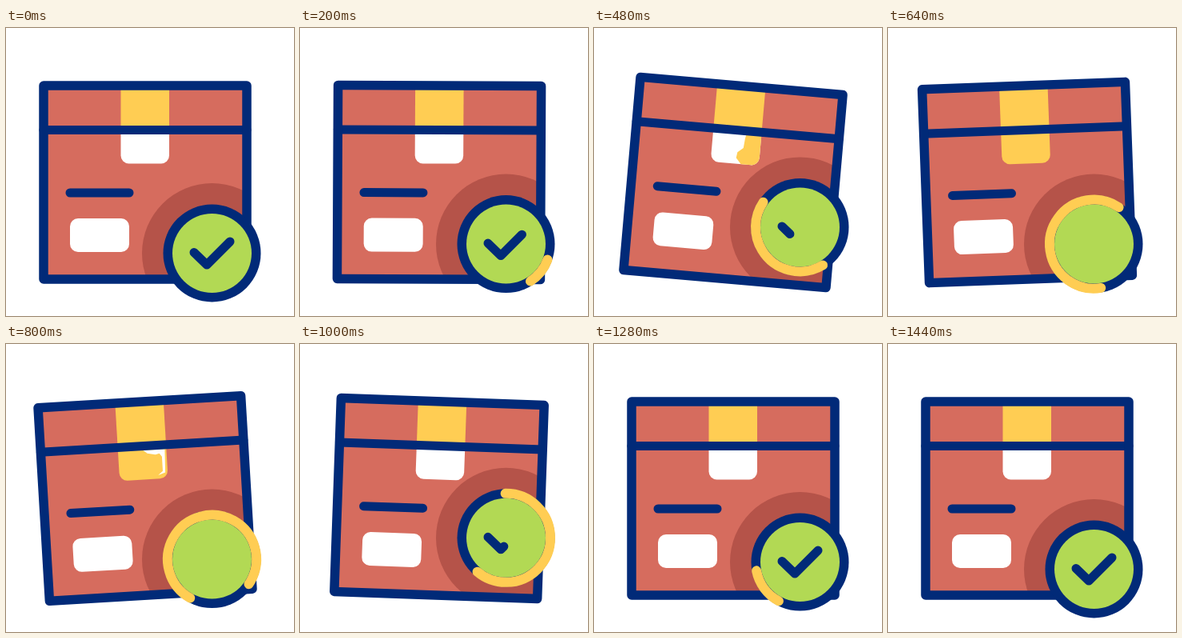
Write an HTML page with a canvas that moves like this. It is 360 px wide and 360 px high and loops after 2 s.

```html
<!DOCTYPE html>
<html lang="en">
<head>
<meta charset="utf-8">
<title>Parcel delivered</title>
<style>
  html, body { margin: 0; width: 100%; height: 100%; overflow: hidden; background: #fff; }
  canvas { display: block; width: 360px; height: 360px; }
</style>
</head>
<body>
<canvas id="stage"></canvas>
<script>
const SIZE = 360, LOOP = 2000, STEP = 40, RAD = Math.PI / 180;
const NAVY = '#012a78', RED = '#d66c5e', SHADE = '#b55349',
      YELLOW = '#ffcd53', GREEN = '#b2d954', WHITE = '#fff';

// Each track is a list of [ms, value].
const TILT = [[150, 0], [480, 5], [720, -4.5], [1020, 2.1], [1240, 0]];
const BADGE_Y = [[80, 281.5], [400, 244.5], [720, 274.5], [1020, 242], [1400, 281.5]];
const CHECK = [[120, 1], [640, 0], [800, 0], [1236, 1]];
const SPIN = [[50, 0], [1362, 180]];
const HEAD = [[115, 0], [962, 360]];
const TAIL = [[773, 0], [1362, 360]];

const FILL_EDGE = [[185, 132], [184, 138], [183, 149], [176, 155], [175, 162], [182, 170]];
const DRAIN_EDGE = [[175, 133], [180, 137], [190, 139], [195, 138], [198, 142], [198, 160], [192, 165]];

const canvas = document.getElementById('stage');
const ctx = canvas.getContext('2d');
const ratio = window.devicePixelRatio || 1;
canvas.width = canvas.height = SIZE * ratio;

const linear = p => p;
const smooth = p => (1 - Math.cos(Math.PI * p)) / 2;

function at(track, t, ease = smooth) {
  if (t <= track[0][0]) return track[0][1];
  for (let i = 1; i < track.length; i++) {
    const [t0, a] = track[i - 1], [t1, b] = track[i];
    if (t < t1) return a + (b - a) * ease((t - t0) / (t1 - t0));
  }
  return track[track.length - 1][1];
}

function shape(color, build) {
  ctx.fillStyle = color;
  ctx.beginPath();
  build();
  ctx.fill();
}

function line(points, color = NAVY, width = 11) {
  ctx.strokeStyle = color;
  ctx.lineWidth = width;
  ctx.beginPath();
  points.forEach(([x, y]) => ctx.lineTo(x, y));
  ctx.stroke();
}

function disc(x, y, r, color) {
  shape(color, () => ctx.arc(x, y, r, 0, 2 * Math.PI));
}

function turn(deg) {
  ctx.translate(174, 193);
  ctx.rotate(deg * RAD);
  ctx.translate(-174, -193);
}

function polygon(points) {
  points.forEach(([x, y]) => ctx.lineTo(x, y));
  ctx.closePath();
}

function drawFlap(t) {
  const full = t >= 560 && t < 880;
  ctx.save();
  ctx.beginPath();
  ctx.roundRect(143.5, 128, 60.5, 41.5, [0, 0, 10, 10]);
  ctx.clip();
  ctx.fillStyle = full ? YELLOW : WHITE;
  ctx.fillRect(140, 125, 70, 50);
  if (t >= 440 && t < 560) {
    const dx = (480 - t) * 0.4;
    shape(YELLOW, () => polygon([...FILL_EDGE.map(([x, y]) => [x + dx, y]), [210, 170], [210, 132]]));
  }
  if (t >= 760 && t < 880) {
    const dx = (800 - t) * 0.4;
    const edge = DRAIN_EDGE.map(([x, y]) => [Math.min(x + dx, 201), y]);
    shape(WHITE, () => polygon([...edge, [201, 162], [202, 133]]));
  }
  ctx.restore();
}

function drawBox(t, y) {
  const tilt = at(TILT, t);
  ctx.save();
  turn(tilt);
  ctx.fillStyle = RED;
  ctx.fillRect(47, 72, 254, 242);

  ctx.save();
  ctx.beginPath();
  ctx.rect(47, 72, 254, 242);
  ctx.clip();
  turn(-tilt);
  disc(257.5, y, 87.5, SHADE);
  ctx.restore();

  ctx.fillStyle = YELLOW;
  ctx.fillRect(143.5, 72, 60.5, 55);
  drawFlap(t);
  shape(WHITE, () => ctx.roundRect(80, 238, 74, 42, 10));
  line([[80, 206], [154, 206]]);
  line([[47, 127.5], [301, 127.5]]);
  ctx.strokeStyle = NAVY;
  ctx.lineWidth = 11.5;
  ctx.strokeRect(47, 72, 254, 242);
  ctx.restore();
}

function drawCheck(part) {
  if (part <= 0) return;
  const leg1 = 22, leg2 = 41, length = part * (leg1 + leg2);
  const a = Math.min(1, length / leg1), b = Math.max(0, (length - leg1) / leg2);
  const points = [[-22.5, -1], [-22.5 + 16 * a, -1 + 15.5 * a]];
  if (b > 0) points.push([-6.5 + 29 * b, 14.5 - 29 * b]);
  line(points);
}

function drawBadge(t, y) {
  ctx.save();
  ctx.translate(257.5, y);
  disc(0, 0, 61, NAVY);
  disc(0, 0, 49.5, GREEN);
  const spin = at(SPIN, t, linear);
  const from = at(TAIL, t, linear), to = at(HEAD, t, linear);
  if (to - from > 0.01) {
    ctx.strokeStyle = YELLOW;
    ctx.lineWidth = 12;
    ctx.beginPath();
    ctx.arc(0, 0, 55.5, (spin + from) * RAD, (spin + to) * RAD);
    ctx.stroke();
  }
  drawCheck(at(CHECK, t));
  ctx.restore();
}

function draw(t) {
  ctx.setTransform(ratio, 0, 0, ratio, 0, 0);
  ctx.fillStyle = WHITE;
  ctx.fillRect(0, 0, SIZE, SIZE);
  ctx.lineCap = ctx.lineJoin = 'round';
  const y = at(BADGE_Y, t);
  drawBox(t, y);
  drawBadge(t, y);
}

let start = null;
function tick(now) {
  if (start === null) start = now;
  const t = (now - start) % LOOP;
  draw(Math.floor(t / STEP) * STEP);
  requestAnimationFrame(tick);
}
draw(0);
requestAnimationFrame(tick);
</script>
</body>
</html>
```
